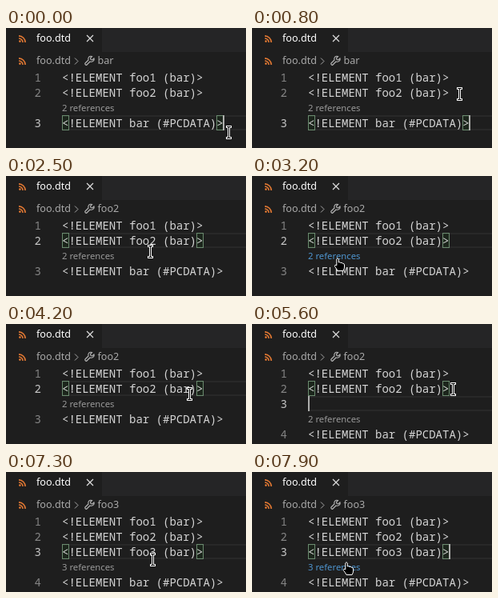
An HTML page for the animation above (8 s loop, 300 px wide and 150 px high).

```html
<!DOCTYPE html>
<html lang="en">
<head>
<meta charset="utf-8">
<style>
html, body { margin: 0; width: 100%; height: 100%; overflow: hidden; background: #1e1e1e; }
body { position: relative; }
div, svg { position: absolute; white-space: pre; box-sizing: border-box; }
svg { left: 0; top: 0; }
.ui { font: 12.6px/22px "Noto Sans", sans-serif; color: #a9a9a9; }
.code, .num { font: 14px/19px "Noto Sans Mono", monospace; color: #d4d4d4; left: 70px; }
.num { left: 20px; width: 24px; text-align: right; color: #858585; }
.num.active { color: #c6c6c6; }
#tabs { left: 120px; top: 0; width: 180px; height: 30px; background: #252526; }
#lens { left: 70px; font: 11.3px/19px "Noto Sans", sans-serif; color: #999; }
#lens.hover { color: #4e94ce; }
#highlight { left: 70px; width: 240px; height: 19px; border: 2px solid #282828; border-width: 2px 0; }
.match { width: 9px; height: 19px; border: 1px solid #6a8a6e; background: #0064001a; }
#caret { width: 2px; height: 19px; background: #aeafad; }
</style>
</head>
<body>
<div id="tabs"></div>
<div class="ui" style="left:38px;top:2px;color:#fff">foo.dtd</div>
<div class="ui" style="left:38px;top:30px">foo.dtd</div>
<div class="ui" id="crumb" style="top:30px"></div>
<div id="highlight"></div>
<div class="match"></div>
<div class="match"></div>
<div id="lens"></div>
<div id="caret"></div>
<svg width="300" height="150" fill="none">
  <defs>
    <g id="feed" stroke="#e37933" stroke-width="1.6">
      <circle cx="1.4" cy="7.6" r="1.3" fill="#e37933" stroke="none"/>
      <path d="M0 4a5 5 0 0 1 5 5M0 .9a8.1 8.1 0 0 1 8.1 8.1"/>
    </g>
    <path id="bar" d="M-2-7H2M0-7V7M-2 7H2" stroke-linecap="square"/>
  </defs>
  <use href="#feed" x="16" y="9"/>
  <use href="#feed" x="16" y="37"/>
  <path d="M101 9l8 8m0-8l-8 8" stroke="#ddd" stroke-width="1.2"/>
  <path d="M86 37.5l4 4-4 4" stroke="#a9a9a9"/>
  <path id="wrench" stroke="#b8b8b8" stroke-width="1.1"
    d="M110 38l-2 2-2-.5-.5-2 2-2c-3-1-5.5 1-4.5 4.5l-4 4c-1 1 1 3 2 2l4-4c3 1 6-1.5 5-4z"/>
  <g id="beam">
    <use href="#bar" stroke="#fff" stroke-width="3"/>
    <use href="#bar" stroke="#000"/>
  </g>
  <path id="hand" fill="#000" stroke="#fff"
    d="M-1.2 1.8Q0-.4 1.3 1.8V6q1.6-.8 2.5.5 1.5-.6 2.4.7 2-.3 2.3 1.8v3q0 2-1.5 4.5H0Q-1.5 13.5-3.3 11.5L-3.6 10.6Q-3.6 8.2-1.2 9.8z"/>
</svg>
<script>
const LOOP = 8000, LEFT = 70, CHAR = 8.4, ROW = 19, TOP = 52;
const $ = id => document.getElementById(id);
const matches = document.querySelectorAll('.match');

// Pointer path: time, x, y
const path = [
  [0, 278, 130], [200, 275, 124], [600, 275, 124], [800, 259, 82], [1000, 259, 82],
  [1100, 258, 79], [1300, 262, 70], [1500, 264, 76], [2000, 264, 76],
  [2200, 248, 80], [2500, 180, 94], [2800, 115, 105], [2900, 105, 106], [3200, 107, 102],
  [3700, 107, 102], [3900, 152, 97], [4200, 229, 87], [4400, 251, 81], [6200, 251, 81],
  [6300, 255, 77], [6600, 248, 98], [6800, 248, 98], [7000, 235, 101], [7400, 165, 112],
  [7700, 130, 111], [7800, 122, 109], [7900, 118, 112], [LOOP, 118, 112]
];

// Last entry of a [time, ...values] list that has begun
const at = (list, t) => list.findLast(step => step[0] <= t);

const carets = [[-300, 3, 24], [1700, 1, 21], [5600, 2, 0], [6500, 2, 21]];
const brackets = [[0, 3, 24], [1800, 1, 21], [5700, -9, 1], [6600, 2, 21]];
const crumbs = [[0, 'bar'], [1900, 'foo2'], [6000, '…'], [7000, 'foo3']];

function pointer(t) {
  const i = path.findIndex(p => p[0] > t);
  const [t0, x0, y0] = path[i - 1], [t1, x1, y1] = path[i];
  const k = (t - t0) / (t1 - t0);
  return [Math.round(x0 + (x1 - x0) * k), Math.round(y0 + (y1 - y0) * k)];
}

function add(className, text) {
  const el = document.createElement('div');
  el.className = className;
  el.textContent = text;
  $('lens').before(el);
  return el;
}

const rowTop = row => TOP + row * ROW;
function place(el, row, x) {
  el.style.top = rowTop(row) + 'px';
  if (x !== undefined) el.style.left = x + 'px';
}

const numbers = [1, 2, 3, 4].map(n => add('num', n));
const lines = ['foo1 (bar)', 'foo2 (bar)', 'foo3 (bar)', 'bar (#PCDATA)']
  .map(s => add('code', `<!ELEMENT ${s}>`));

function draw(now) {
  const t = Math.floor(now % LOOP / 100) * 100;
  const inserted = t >= 5600, lensRow = inserted ? 3 : 2;
  const [since, row, column] = at(carets, t);

  lines.forEach((line, i) => place(line, i < 3 ? i : lensRow + 1));
  lines[2].hidden = t < 6500;
  numbers.forEach((number, i) => {
    place(number, i === 2 && !inserted ? 3 : i < 3 ? i : 4);
    number.hidden = i === 3 && !inserted;
    number.classList.toggle('active', i === (t >= 1700 && !inserted ? 1 : 2));
  });

  place($('highlight'), row);
  place($('caret'), row, Math.floor(LEFT + column * CHAR));
  // The first caret is already 300 ms into its blink
  $('caret').hidden = Math.floor((t - since) / 500) % 2 === 1;

  const [, matchRow, length] = at(brackets, t);
  place(matches[0], matchRow, LEFT);
  place(matches[1], matchRow, Math.floor(LEFT + (length - 1) * CHAR));

  const name = at(crumbs, t)[1], symbol = name !== '…';
  $('crumb').textContent = name;
  $('crumb').style.left = (symbol ? 114.5 : 96) + 'px';
  $('wrench').style.display = symbol ? '' : 'none';

  const [x, y] = pointer(t);
  const top = rowTop(lensRow);
  const hover = x >= LEFT && x < 135 && y >= top && y < top + ROW;
  place($('lens'), lensRow);
  $('lens').textContent = (t < 7100 ? 2 : 3) + ' references';
  $('lens').classList.toggle('hover', hover);
  $('hand').style.display = hover ? '' : 'none';
  $('beam').style.display = hover ? 'none' : '';
  $('hand').setAttribute('transform', `translate(${x} ${y})`);
  $('beam').setAttribute('transform', `translate(${x + .5} ${y + .5})`);
}

const start = performance.now();
function tick() {
  draw(performance.now() - start);
  requestAnimationFrame(tick);
}
tick();
</script>
</body>
</html>
```
